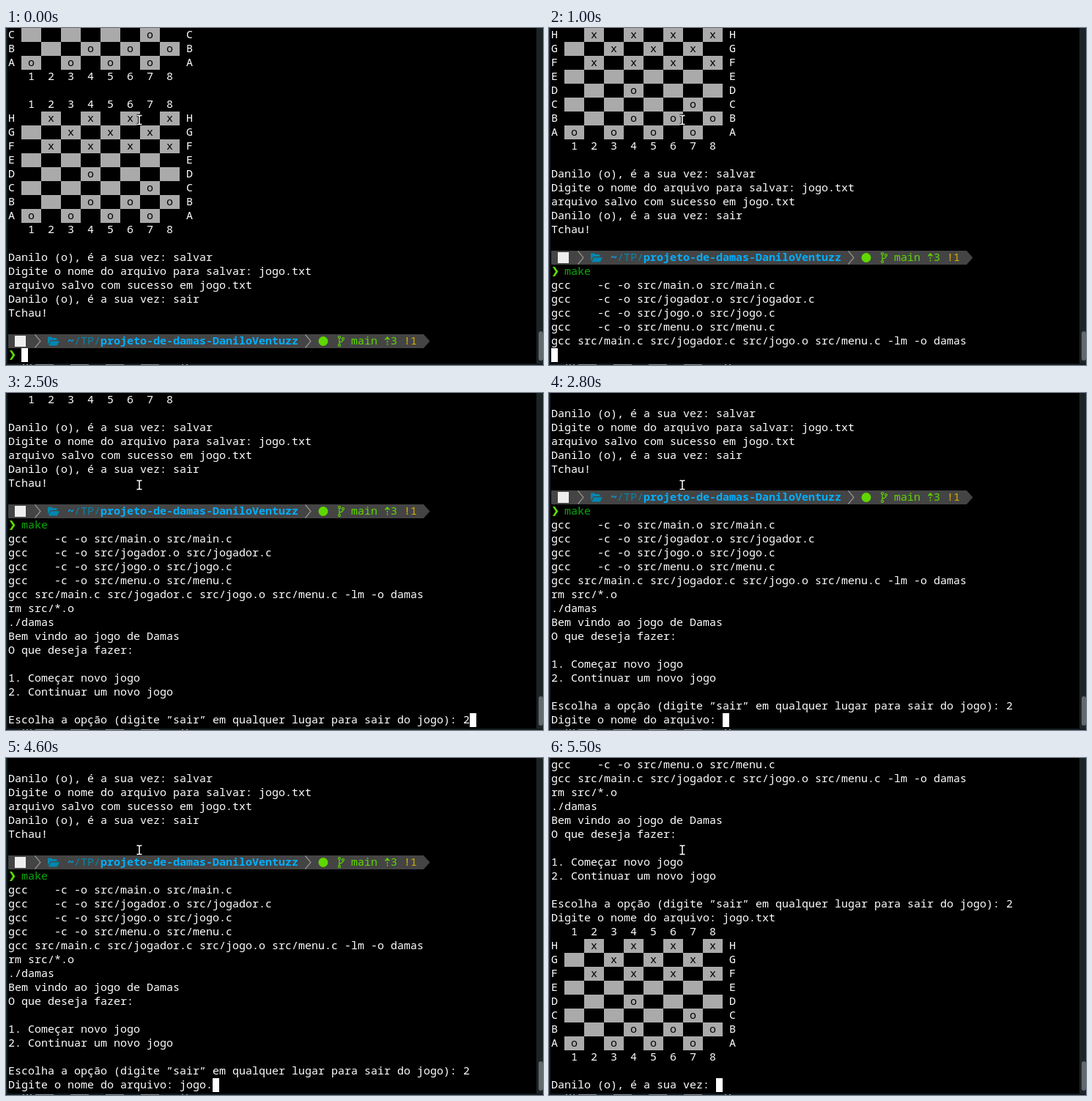
An HTML page with a canvas that plays this animation: 733 by 460 pixels, repeating every 8 s.

```html
<!DOCTYPE html>
<html lang="pt">
<head>
<meta charset="utf-8">
<title>Damas</title>
<style>
html, body { margin: 0; width: 733px; height: 460px; overflow: hidden; background: #000; }
canvas { display: block; }
</style>
</head>
<body>
<canvas id="stage" width="733" height="460"></canvas>
<script>
const ctx = document.getElementById('stage').getContext('2d');
const CW = 9, RH = 19, ROWS = 24, LEFT = 3;
const LIME = '#5fd700', GREEN = '#0aa80a', RED = '#ed1515';
const colX = c => LEFT + c * CW;

function rect(x, y, w, h, color) {
  ctx.fillStyle = color;
  ctx.fillRect(x, y, w, h);
}

function put(s, col, y, color = '#fff', weight = 500) {
  ctx.font = weight + ' 15px "Noto Sans Mono", "DejaVu Sans Mono", monospace';
  ctx.fillStyle = color;
  [...s].forEach((ch, i) => ctx.fillText(ch, colX(col + i), y + 14));
}

function path(d, x, y, { fill, stroke, width = 1 }) {
  const p = new Path2D(d);
  ctx.save();
  ctx.translate(x, y);
  if (fill) { ctx.fillStyle = fill; ctx.fill(p); }
  if (stroke) { ctx.strokeStyle = stroke; ctx.lineWidth = width; ctx.stroke(p); }
  ctx.restore();
}

const text = (s, color) => y => put(s, 0, y, color);
const chevron = y => path('M2 3H5L9.5 9.5L5 16H2L6 9.5Z', LEFT, y, { fill: LIME });

// Checkers board
const pieces = [' x x x x', '  x x x ', ' x x x x', '', '   o', '      o ', '   o o o', 'o o o o '];
const numbers = text('   1  2  3  4  5  6  7  8');
const boardRow = (squares, r) => y => {
  const name = 'HGFEDCBA'[r];
  put(name, 0, y);
  put(name, 27, y);
  for (let c = 0; c < 8; c++) {
    if ((c + r) % 2) rect(colX(2 + 3 * c), y, 3 * CW, RH, '#aaa');
    put(squares[c] || ' ', 3 + 3 * c, y, '#000');
  }
};
const board = [numbers, ...pieces.map(boardRow), numbers];

// Status bar above the shell input
function prompt(y) {
  path('M0 0H567L575.5 9.5L567 19H0Z', LEFT, y, { fill: '#444' });
  rect(12, y + 2, 15, 15, '#eee');
  for (const col of [4, 45])
    path('M0.5 0.5L8 9.5L0.5 18.5', colX(col), y, { stroke: '#949494', width: 1.2 });
  path('M0 14V4.5Q0 3.5 1 3.5H5L6.5 5H11.5Q12.5 5 12.5 6V8H4.5Q3.5 8 3 9Z M1 15.5L4 9.3H16L13.3 14.8Q13 15.5 12 15.5Z',
    57, y, { fill: '#0087af' });
  put('~', 9, y, '#00afff', 600);
  put('/TP/', 10, y, '#0087af');
  put('projeto-de-damas-DaniloVentuzz', 14, y, '#00afff', 600);
  ctx.beginPath();
  ctx.arc(433, y + 9.5, 6.5, 0, 7);
  ctx.fillStyle = LIME;
  ctx.fill();
  path('M2 5.5V13.5M2 11Q7 10.5 7 7.5M3.5 4A1.5 1.5 0 1 1 .5 4A1.5 1.5 0 1 1 3.5 4M3.5 15A1.5 1.5 0 1 1 .5 15A1.5 1.5 0 1 1 3.5 15M8.5 6A1.5 1.5 0 1 1 5.5 6A1.5 1.5 0 1 1 8.5 6',
    453, y, { stroke: LIME, width: 1.2 });
  put('main', 52, y, LIME);
  path('M1.5 7.5L4.5 4L7.5 7.5M4.5 4V7.5M4.5 9V11M4.5 12.5V14.5', colX(57), y, { stroke: LIME, width: 1.4 });
  put('3', 58, y, LIME);
  put('!1', 60, y, '#d7af00');
}

const TURN = 'Danilo (o), é a sua vez: ';
const MENU = 'Escolha a opção (digite ”sair” em qualquer lugar para sair do jogo): ';
const FILE = 'Digite o nome do arquivo: ';
const compile = name => text(`gcc    -c -o src/${name}.o src/${name}.c`);
const blank = text('');

const log = [
  ...board.slice(-4), blank, ...board, blank,
  text(TURN + 'salvar'),
  text('Digite o nome do arquivo para salvar: jogo.txt'),
  text('arquivo salvo com sucesso em jogo.txt'),
  text(TURN + 'sair'),
  text('Tchau!'),
  blank, prompt,
  y => { chevron(y); put('make', 2, y, GREEN); },
  ...['main', 'jogador', 'jogo', 'menu'].map(compile),
  text('gcc src/main.c src/jogador.c src/jogo.o src/menu.c -lm -o damas'),
  text('rm src/*.o'),
  text('./damas'),
  text('Bem vindo ao jogo de Damas'),
  text('O que deseja fazer:'),
  blank,
  text('1. Começar novo jogo'),
  text('2. Continuar um novo jogo'),
  blank,
  text(MENU + '2'),
  text(FILE + 'jogo.txt'),
  ...board, blank
];

// [start ms, finished log lines, current line, its colour]
const SHELL = 23;
const steps = [
  [0, SHELL, '  '],
  [100, SHELL, '  ma', RED],
  [200, SHELL, '  mak', RED],
  [400, SHELL, '  make', RED],
  [500, SHELL, '  make', GREEN],
  [800, 25, ''],
  [900, 27, ''],
  [1000, 29, ''],
  [1100, 37, MENU],
  [2500, 37, MENU + '2'],
  [2800, 38, FILE],
  ...[3600, 3700, 4000, 4200, 4600, 4800, 5000, 5200]
    .map((ms, i) => [ms, 38, FILE + 'jogo.txt'.slice(0, i + 1)]),
  [5500, 50, TURN]
];

function windowEdges() {
  rect(0, 0, 2, 460, '#17242a');
  rect(724, 0, 9, 460, '#1c2427');
  ctx.fillStyle = '#626a6d';
  ctx.beginPath();
  ctx.roundRect(727, 414, 6, 40, 3);
  ctx.fill();
  rect(0, 458, 733, 2, '#151d20');
  for (let i = 0; i < 4; i++) rect(40 + 48 * i, 459, 25, 1, '#858585');
  for (const x of [23, 28, 33, 240, 246]) rect(x, 459, 2, 1, '#999');
}

function pointer() {
  const beam = 'M178.5 119.5H181L182 120.5L183 119.5H185.5M182 120.5V130.5M178.5 131.5H181L182 130.5L183 131.5H185.5';
  path(beam, 0, 0, { stroke: '#000', width: 3.5 });
  path(beam, 0, 0, { stroke: '#fff', width: 1.5 });
}

function draw() {
  const t = performance.now() % 8000;
  const [, done, line, color] = steps.findLast(s => s[0] <= t);
  const first = done + 1 - ROWS, y = (ROWS - 1) * RH;
  rect(0, 0, 733, 460, '#000');
  log.slice(first, done).forEach((item, i) => item(i * RH));
  if (done === SHELL) chevron(y);
  put(line, 0, y, color);
  rect(colX(line.length), y, CW, RH, '#fff');
  windowEdges();
  pointer();
  requestAnimationFrame(draw);
}
draw();
</script>
</body>
</html>
```
